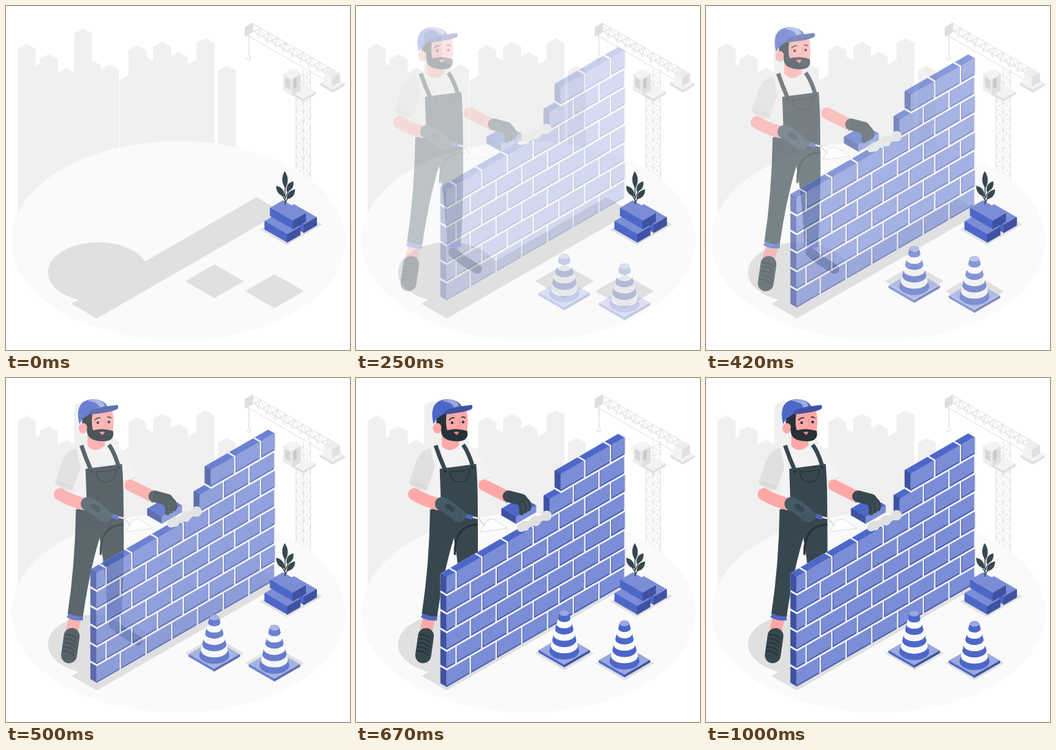
An HTML page for the animation above (1040 ms loop, 500x500 px).

```html
<!DOCTYPE html>
<html lang="en">
<head>
<meta charset="utf-8">
<title>Bricklayer</title>
<style>
html, body { margin: 0; width: 100%; height: 100%; overflow: hidden; background: #fff; }
svg { display: block; width: 100vw; height: 100vh; }
</style>
</head>
<body>
<svg id="stage" viewBox="0 0 500 500"></svg>
<script>
const BLUE = '#4d67c9', LIGHT = '#7b8dd6', DARK = '#3e52a1', PALE = '#9aa8e0', EDGE = '#4259b0';
const SLATE = '#37474f', GLOVE = '#455a64', INK = '#263238', SKIN = '#ffa8a7';
const GREY = '#e0e0e0', MIST = '#ededed', CLOTH = '#f3f3f3', WHITE = '#fafafa';
const SLOPE = 0.577;

// ---- Drawing helpers ----
const loop = (n, f) => Array.from({ length: n }, (_, i) => f(i)).join('');
const shape = (fill, d) => `<path fill="${fill}" d="${d}"/>`;
const line = (stroke, width, d, cap = 'round') =>
  `<path fill="none" stroke="${stroke}" stroke-width="${width}" stroke-linecap="${cap}" d="${d}"/>`;
const oval = (fill, x, y, rx, ry = rx) =>
  `<ellipse fill="${fill}" cx="${x}" cy="${y}" rx="${rx}" ry="${ry}"/>`;
const poly = (fill, ...pts) =>
  `<polygon points="${pts.join(' ')}" fill="${fill}" stroke="${fill}" stroke-width=".8" stroke-linejoin="round"/>`;

// Isometric solids: (x, y) is the left corner of the top, a runs down right, b runs up right.
const iso = (x, y) => (a, b, h = 0) => [x + a + b, y + (a - b) * SLOPE + h];
function tile(x, y, a, b, fill) {
  const p = iso(x, y);
  return poly(fill, p(0, 0), p(a, 0), p(a, b), p(0, b));
}
function box(x, y, a, b, h, top, left, right) {
  const p = iso(x, y);
  return tile(x, y, a, b, top) +
    poly(left, p(0, 0), p(a, 0), p(a, 0, h), p(0, 0, h)) +
    poly(right, p(a, 0), p(a, b), p(a, b, h), p(a, 0, h));
}

// ---- Backdrop ----
function city() {
  const peaks = [[30, 55], [49, 84], [62, 70], [88, 90], [112, 33], [125, 79], [151, 85], [178, 101],
    [191, 57], [204, 74], [227, 52], [251, 67], [277, 78], [290, 47], [321, 87]];
  return peaks.map(([x, y]) => shape('#f0f0f0', `M${x - 13} 310V${y + 7}L${x} ${y}l13 7V310Z`)).join('');
}

function crane() {
  const mast = loop(12, i => `M421.5 ${95 + i * 13.5}l10.5 6 10.500-6m-21 0l10.500 19 10.500-19m-21 13l10.500-7 10.500 7`);
  const boom = loop(10, i => `M${358 + i * 12.3} ${25 + i * 7.1}l-4 14 16-7m-12-7l8 19 4-12m-12-7l-10 6`);
  const rails = loop(3, i => `M${421.5 + i * 10.5} 92V260`) + loop(3, i => `M${358 - i * 4} ${25 + i * 8.5}l127 73.300`);
  return line(GREY, .8, mast + boom) + line(GREY, 1, rails) +
    line(GREY, 1.3, 'M353 42V72q4 3 1 6-4 1-4-3') +
    box(347.5, 31, 0, 11, 13, MIST, MIST, '#dedede') +
    box(457, 112, 18, 17, 3, CLOTH, GREY, GREY) +
    box(463, 98, 11, 11, 12, MIST, CLOTH, GREY) +
    box(414, 125, 18, 18, 3, CLOTH, GREY, GREY) +
    box(403, 99, 13, 12, 23, CLOTH, MIST, GREY) +
    box(406, 104, 7, 0, 13, GREY, '#d6d6d6', GREY) +
    box(418, 107, 0, 4, 13, GREY, GREY, '#c8c8c8');
}

const shadows = () => oval(GREY, 134, 387, 73, 43.5) + tile(96, 433, 36, 268, GREY) +
  tile(261, 400, 42, 42, GREY) + tile(348.5, 414.5, 42, 42, GREY) + tile(370, 325, 38, 51, GREY);

// ---- Worker, from far to near ----
const legs = () =>
  line(SKIN, 17, 'M163 342V354') +
  line(SLATE, 14, 'M162 358Q172 368 197 382') +
  shape(SLATE, 'M134 190H176Q178 280 173 347Q163 351 153 346Q150 270 138 215Z') +
  line(BLUE, 6, 'M153 346Q163 350 173 347', 'butt') +
  line(SKIN, 18, 'M106 348L102 364') +
  line(SLATE, 23, 'M101 375L97 403') +
  loop(5, i => line(INK, 1.5, `M${92 - i} ${373 + i * 6}q9-1 16 6`));

const clothes = () =>
  shape(CLOTH, 'M106 102Q125 95 150 97Q170 98 176 108L178 190H112Z') +
  shape(CLOTH, 'M160 97Q173 99 178 110L198 146Q190 154 178 155L168 130Z') +
  shape(GREY, 'M108 102Q90 105 84 130L76 153Q86 163 102 163L114 130Z') +
  line('#c9c9c9', .8, 'M79 151q11 2 23 7m-22-4q11 2 22 7M177 150q11-1 18-7') +
  shape(SKIN, 'M124 80H149V98Q136 111 124 99Z') +
  shape(SLATE, 'M121 132L174 125Q177 160 176 216H147Q128 270 117 349L95 343Q106 270 107 191L123 188Z') +
  line(SLATE, 6, 'M115 98Q121 116 129 134M155 97Q163 108 169 128', 'butt') +
  line(INK, 3, 'M143 256Q142 215 175 213') +
  line(INK, 1.2, 'M136 136q15 1 29-3-1 18-14 18-14 0-15-15') +
  oval(INK, 129, 136, 2) + oval(INK, 169, 130, 2) +
  line(BLUE, 6, 'M95 345Q106 351 117 349', 'butt');

const head = () =>
  oval(INK, 122, 64, 6, 12) +
  shape(SKIN, 'M124 52L160 47Q164 65 160 80L132 92Q125 80 124 52Z') +
  oval(SKIN, 117.5, 73, 6.5, 7.5) +
  shape(INK, 'M124 52H131Q129 68 132 76Q146 72 161 77Q164 92 147 92Q123 92 123 76Z') +
  line(INK, 1.6, 'M135 61q3-4 7-3m11-1q3-1 5 1') + oval(INK, 139, 65, 2) + oval(INK, 155, 64, 2) +
  line('#f28f8f', 1.2, 'M149 60l2 9-4 1') + shape('#ed847e', 'M141 79q6-2 8 0l-3 4Z') +
  shape(BLUE, 'M112 67Q104 33 130 31Q147 30 153 41L167 39Q172 44 163 47Q147 51 126 53Q117 57 112 67Z') +
  shape(PALE, 'M124 33Q146 27 149 41L142 43Q139 35 124 33Z') +
  shape(DARK, 'M125 53Q128 42 168 40Q174 49 125 53Z');

const hands = () =>
  line(SKIN, 18, 'M84 169Q98 178 118 183') +
  `<path fill="#fff" stroke="#dcdcdc" d="M180 223.500L189 206.500 199 205 220 218.500Z"/>` +
  line(GREY, 2.5, 'M168 202l9 2 9 10') + line(BLUE, 6, 'M155 199l14 4', 'butt') +
  line(GLOVE, 20, 'M124 183Q136 188 148 200') + line(GLOVE, 7, 'M140 187L157 199') +
  line(SLATE, 8, 'M133 187L139 191') + line(SLATE, 1, 'M139 207l6-8m1 11l5-8') +
  line(SKIN, 17, 'M186 156L218 172') +
  box(211, 190, 21, 29, 9.5, BLUE, DARK, LIGHT) +
  line(SLATE, 17, 'M221 172L240 177') +
  loop(3, i => line(SLATE, 7, `M${234 + i * 6} 177q7 6 ${6 - i} ${19 - i * 3}`)) +
  line(GLOVE, 1.2, 'M220 165q-5 7-2 16m24 14q2-8-2-13m9 9q1-8-4-12');

// ---- Wall: its front runs from LEFT to RIGHT in eight rows ----
const LEFT = 132, RIGHT = 390, ROW = 27, PITCH = 37.4, FACE = 24, DEPTH = 9, GAP = 2.4;

function brick(x, w, row, bevel) {
  const top = 448 - SLOPE * (x - LEFT) - ROW * row - FACE;
  const solid = (len, h, ...fills) => box(x - DEPTH, top - DEPTH * SLOPE, DEPTH, len, h, ...fills);
  return solid(w + GAP, row ? ROW : FACE, CLOTH, CLOTH, CLOTH) +
    solid(w, FACE, BLUE, DARK, EDGE) +
    box(x + bevel, top - bevel * SLOPE, 0, w - bevel, FACE - 2, LIGHT, LIGHT, LIGHT);
}

function wall() {
  const rows = loop(8, row => {
    const start = row < 6 ? LEFT : row < 7 ? 282 : 298;
    return loop(8, i => {
      const slot = (row % 2 ? 108.8 : 129.6) + (7 - i) * PITCH;
      const x = Math.max(slot, start), end = Math.min(slot + PITCH - GAP, RIGHT);
      return end - x > 5 ? brick(x, end - x, row, x > slot ? 0 : 2) : '';
    });
  });
  return rows + loop(8, i => oval(GREY, 240 + i * 5.3, 217 - i * 2.5, 6 + 1.5 * Math.sin(i * 2)));
}

// ---- Brick pile with a sprig ----
const block = (x, y) => box(x, y, 33, 18.5, 11.5, LIGHT, BLUE, DARK);
const leaf = (x, y, turn, len) =>
  `<path fill="${SLATE}" transform="translate(${x} ${y}) rotate(${turn})" d="M0 0Q8 ${-len / 2} 0 ${-len}Q-8 ${-len / 2} 0 0"/>`;
const pile = () => block(400, 299) + block(376, 313) + block(384, 293.5) +
  line(SLATE, 1.3, 'M405.500 288V260M406 283l-7-12m7 8l6-13m-6 20q4-9 9-14') +
  leaf(406, 265, -2, 25) + leaf(405, 277, -38, 20) + leaf(408, 270, 32, 18) + leaf(408, 281, 40, 19);

// ---- Traffic cone: (x, y) is the centre of its tip ----
function cone(x, y) {
  const bands = loop(7, i => {
    const a = 55 * i / 7, b = 55 * (i + 1) / 7, u = 7 + a * .27, v = 7 + b * .27;
    return shape(i % 2 ? WHITE : BLUE, `M${x - u} ${y + a}A${u} ${u * .57} 0 0 0 ${x + u} ${y + a}` +
      `L${x + v} ${y + b}A${v} ${v * .57} 0 0 1 ${x - v} ${y + b}Z`);
  });
  return box(x - 37, y + 54, 37, 37, 3, PALE, BLUE, DARK) + bands + oval(PALE, x, y, 7, 4);
}

const group = (id, content) => `<g id="${id}">${content}</g>`;
document.getElementById('stage').innerHTML = city() + crane() + oval(WHITE, 250.5, 341.3, 243, 145) + shadows() +
  group('man', legs() + clothes() + head() + hands()) + group('wall', wall()) + pile() +
  group('cones', cone(302.7, 342.5) + cone(390.2, 357));

// ---- Entrance: cubic-bezier(.36, -.01, .5, 1.38) in 24 steps a second ----
const bezier = (a, b, s) => 3 * (1 - s) ** 2 * s * a + 3 * (1 - s) * s * s * b + s ** 3;
function ease(t) {
  let lo = 0, hi = 1;
  for (let i = 0; i < 24; i++) {
    const mid = (lo + hi) / 2;
    if (bezier(.36, .5, mid) < t) lo = mid; else hi = mid;
  }
  return bezier(-.01, 1.38, lo);
}

function place(id, x, y, opacity) {
  const g = document.getElementById(id);
  g.setAttribute('transform', `translate(${x} ${y})`);
  g.setAttribute('opacity', Math.min(1, Math.max(0, opacity)));
}

const start = performance.now();
function draw() {
  const ms = (performance.now() - start) % 1040;
  const step = Math.floor((ms + 5.1) * 24 / 1000);
  // The stage stays empty for the first two steps.
  const p = step < 2 ? 0 : ease(Math.min(1, (step + 1) / 24));
  const off = 30 * (1 - p);
  place('man', -off, 0, p);
  place('wall', 0, -off, p);
  place('cones', 0, off, p);
  requestAnimationFrame(draw);
}
draw();
</script>
</body>
</html>
```
